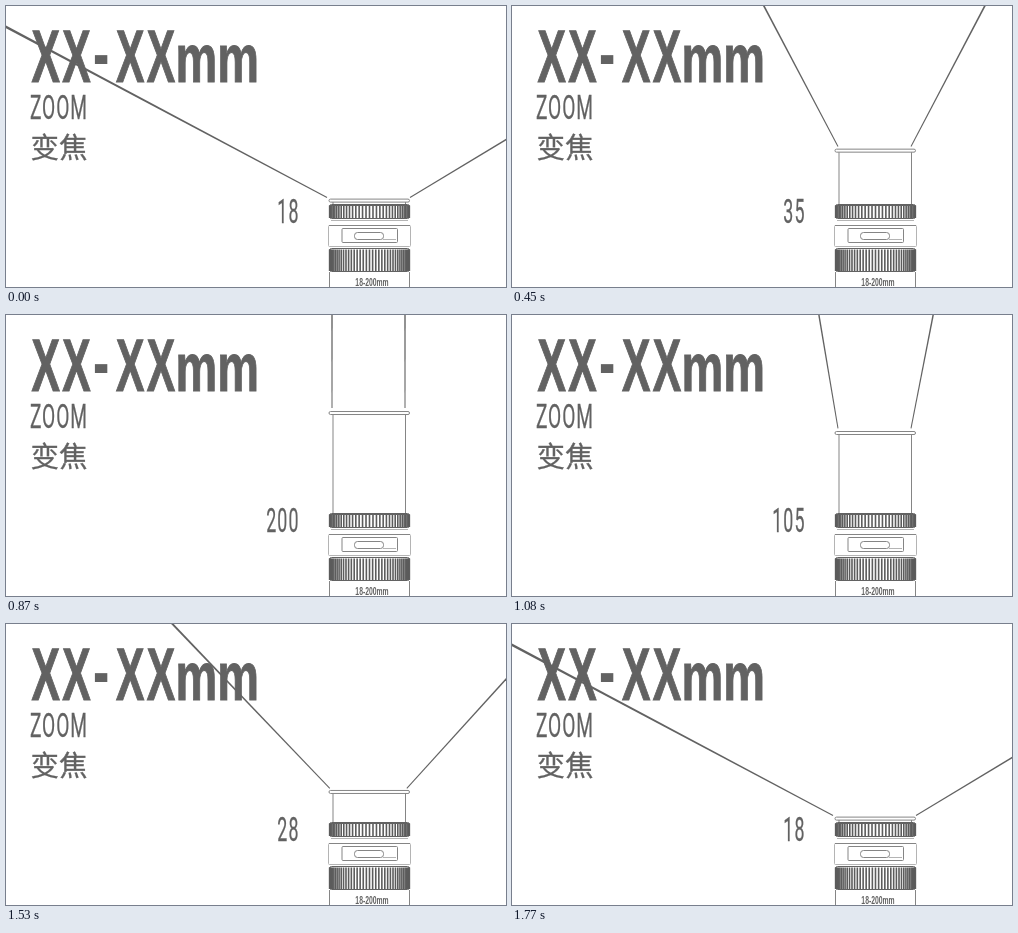
These frames come from a looping animation (500 px wide and 281 px high, 1800 ms). An HTML page with a canvas:

```html
<!DOCTYPE html>
<html lang="zh">
<head>
<meta charset="utf-8">
<title>Zoom</title>
<style>
html, body { margin: 0; width: 100%; height: 100%; overflow: hidden; background: #fff; }
canvas { display: block; width: 500px; height: 281px; }
</style>
</head>
<body>
<canvas id="stage" width="500" height="281"></canvas>
<script>
const ctx = document.getElementById('stage').getContext('2d');
const INK = '#626262', MID = '#858585', PALE = '#b4b4b4';
const SANS = '"Liberation Sans", Arial, sans-serif';
const TITLE = 'bold 74px ' + SANS;
const THIN = '33px Roboto, sans-serif';
const CJK = '28.5px "Noto Sans CJK SC", "Noto Sans CJK JP", "Noto Sans CJK", sans-serif';
const STEP = 30, COUNT = 60, LAST = COUNT / 2 - 1;
const FOCAL = [18, 24, 28, 35, 50, 105, 200];

function label(str, x, y, font, { narrow = 1, gap = 0, align = 'left', weight = 0 } = {}) {
  ctx.save();
  ctx.translate(x, y);
  ctx.scale(narrow, 1);
  ctx.font = font;
  ctx.letterSpacing = gap + 'px';
  ctx.textAlign = align;
  ctx.fillStyle = ctx.strokeStyle = INK;
  ctx.fillText(str, 0, 0);
  if (weight) {
    ctx.lineWidth = weight;
    ctx.strokeText(str, 0, 0);
  }
  ctx.restore();
}

function line(x1, y1, x2, y2, color = MID, width = 1) {
  ctx.strokeStyle = color;
  ctx.lineWidth = width;
  ctx.beginPath();
  ctx.moveTo(x1, y1);
  ctx.lineTo(x2, y2);
  ctx.stroke();
}

function box(x, y, w, h, r, color = MID, width = 1) {
  ctx.beginPath();
  ctx.roundRect(x, y, w, h, r);
  ctx.fillStyle = '#fff';
  ctx.fill();
  ctx.strokeStyle = color;
  ctx.lineWidth = width;
  ctx.stroke();
}

// Ribbed ring: the ribs crowd together towards its edges
function grip(y, h, ribs) {
  box(323.5, y, 80, h, 2, INK);
  for (let i = 1; i < ribs; i++) {
    const x = 363.5 - 40 * Math.cos(Math.PI * i / ribs);
    line(x, y + 1, x, y + h - 0.5, '#5c5c5c', 1.6);
  }
}

function body() {
  grip(198.5, 14, 36);
  line(324, 199.5, 403, 199.5, INK);
  line(325, 214.5, 402, 214.5, PALE);
  box(322.5, 219.5, 82, 21, 1, PALE);
  line(323, 219.5, 404, 219.5, MID);
  box(336, 222.5, 55.5, 14, 1, MID);
  box(348.5, 226.5, 29, 7, 3, MID);
  line(377, 233.5, 390, 233.5, PALE);
  grip(242.5, 23, 40);
  line(323.5, 266, 323.5, 281, MID);
  line(403.5, 266, 403.5, 281, MID);
  label('18-200mm', 366, 279.5, 'bold 10px ' + SANS, { narrow: 0.68, align: 'center' });
}

// Edge of the field of view, widening slightly away from the lens
function ray(x, y, degrees, side) {
  const a = Math.max(0, degrees) * Math.PI / 180;
  const len = (y + 5) / Math.cos(a);
  const far = 0.5 + len * 0.002;
  ctx.save();
  ctx.translate(x, y);
  ctx.rotate(side * a);
  ctx.beginPath();
  ctx.moveTo(-0.5, 0);
  ctx.lineTo(-far, -len);
  ctx.lineTo(far, -len);
  ctx.lineTo(0.5, 0);
  ctx.fillStyle = INK;
  ctx.fill();
  ctx.restore();
}

function heading() {
  const cap = { narrow: 0.575, gap: 4, weight: 1.2 };
  label('XX', 25.5, 75.5, TITLE, cap);
  label('-', 87, 72.5, TITLE, { narrow: 0.66 });
  label('XX', 110, 75.5, TITLE, cap);
  label('mm', 169.5, 75.5, 'bold 68px ' + SANS, { narrow: 0.69, weight: 1 });
  label('ZOOM', 24, 113, THIN, { narrow: 0.58, gap: 1.5, weight: 0.3 });
  label('变焦', 24.5, 151.5, CJK, { weight: 0.3 });
}

function draw(p) {
  ctx.fillStyle = '#fff';
  ctx.fillRect(0, 0, 500, 281);
  heading();

  const front = 194.6 - 3.33 * p;
  line(327, front, 327, 198, MID);
  line(399.5, front, 399.5, 198, MID);
  box(323, front - 1.5, 80.5, 3, 1.5, MID);
  body();

  const rayY = 191.5 - 3.4 * p;
  ray(Math.min(326, 321 + 0.35 * p), rayY, 62 - 2.28 * p, -1);
  ray(Math.max(399, 404 - 0.4 * p), rayY, 58.9 - 2.08 * p, 1);

  const mark = Math.round(p / LAST * (FOCAL.length - 1));
  label(FOCAL[mark], 293.5, 217, THIN, { narrow: 0.54, gap: 2, align: 'right', weight: 0.3 });
}

const start = performance.now();
function tick() {
  const i = Math.floor((performance.now() - start) / STEP) % COUNT;
  draw(Math.min(i, COUNT - 1 - i));
  requestAnimationFrame(tick);
}
tick();
</script>
</body>
</html>
```
